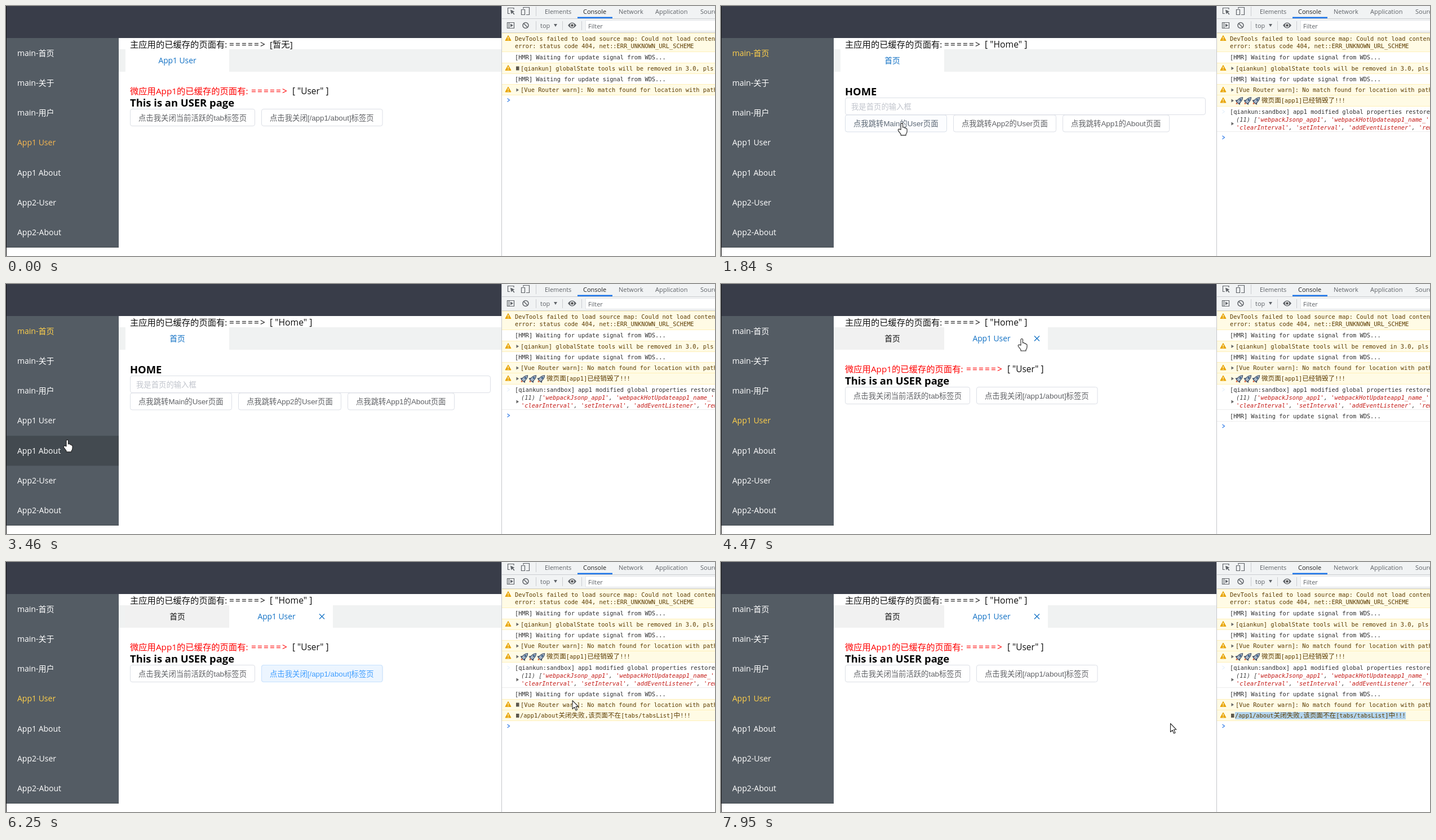
An HTML page that plays this animation: 1258x445 px, repeating every 8 s.

```html
<!DOCTYPE html>
<html lang="zh">
<head>
<meta charset="utf-8">
<title>Micro app tabs</title>
<style>
html, body { margin: 0; width: 100%; height: 100%; overflow: hidden; background: #fff; }
svg { display: block; }
text { white-space: pre; }
.ui { font-family: "Open Sans", "Noto Sans CJK SC", "Noto Sans CJK JP", sans-serif; }
.btn { font-family: "Liberation Sans", "Noto Sans CJK SC", "Noto Sans CJK JP", sans-serif; }
.mono { font-family: "DejaVu Sans Mono", "Noto Sans CJK SC", "Noto Sans CJK JP", monospace; }
</style>
</head>
<body>
<svg id="stage" width="1258" height="445" viewBox="0 0 1258 445"></svg>
<script>
const LOOP = 8000, HOME = 1830, APP = 3950, LOG = 4100, TAB = 4270, WARN = 4600, FAIL = 6090, SELECT = 7020;
const MENU = ['main-首页', 'main-关于', 'main-用户', 'App1 User', 'App1 About', 'App2-User', 'App2-About'];
const ROW = 53.3, BROWN = '#5c3c00', INK = '#303030', RED = '#c41a16';

const rect = (x, y, w, h, fill, extra = '') => `<rect x="${x}" y="${y}" width="${w}" height="${h}" fill="${fill}" ${extra}/>`;
const path = (d, fill, extra = '') => `<path d="${d}" fill="${fill}" ${extra}/>`;
const line = (d, color, w = 1) => path(d, 'none', `stroke="${color}" stroke-width="${w}"`);
// y is the vertical middle of the line
const text = (x, y, s, size, fill, extra = '', cls = 'ui') =>
  `<text class="${cls}" x="${x}" y="${(y + size * .36).toFixed(1)}" font-size="${size}" fill="${fill}" ${extra}>${s}</text>`;
const mono = (x, y, s, fill = INK, extra = '') =>
  text(x, y, s.replace(/[\u4e00-\u9fff]+/g, '<tspan font-size="11.6">$&</tspan>'), 10.35, fill, extra, 'mono');
// shown while from <= t < to
const during = (from, to, body) => `<g data-from="${from}" data-to="${to}">${body}</g>`;

const buttons = [
  { x: 220, y: 183.5, w: 221, s: '点击我关闭当前活跃的tab标签页', page: 'app' },
  { x: 453, y: 183.5, w: 214.5, s: '点击我关闭[/app1/about]标签页', page: 'app' },
  { x: 220, y: 194, w: 180, s: '点我跳转Main的User页面', page: 'home' },
  { x: 412, y: 194, w: 182, s: '点我跳转App2的User页面', page: 'home' },
  { x: 606, y: 194, w: 189, s: '点我跳转App1的About页面', page: 'home' }
];
function button(b) {
  const face = (bg, edge, ink) => rect(b.x + .5, b.y, b.w, 30, bg, `rx="3.5" stroke="${edge}"`) +
    text(b.x + 15, b.y + 15.3, b.s, 13.35, ink, '', 'btn');
  return face('#fff', '#dcdfe6', '#606266') +
    `<g class="hover" opacity="0">${face('#ecf5ff', '#c6e2ff', '#409eff')}</g>`;
}
const buttonsOf = page => buttons.filter(b => b.page === page).map(button).join('');

const arrow = (x, y, fill) => text(x, y, '=====>', 15.4, fill, 'letter-spacing="2.2"');
const title = (y, s) => text(220, y, s, 18.4, '#000', 'font-weight="700"');

function shell() {
  const items = MENU.map((s, i) => text(20, 83.5 + i * ROW, s, 14, '#fff', 'data-item')).join('');
  return rect(0, 0, 880, 57, '#393d49') + rect(1, 57, 199, 373, '#545c64') +
    rect(1, 57, 199, ROW, '#434a50', 'id="menuHover"') + rect(1, 429, 199, 1, '#434a50') +
    items + rect(0, 0, 1, 445, '#111');
}

function tabs() {
  const blue = '#1070c4', mid = 'text-anchor="middle"';
  const label = (x, s, fill) => text(x, 97, s, 13.8, fill, mid);
  return text(220, 68, '主应用的已缓存的页面有:', 15.3, '#111') + arrow(396, 68, '#111') +
    during(0, HOME, text(468, 68, '[暂无]', 15.3, '#111')) +
    during(HOME, LOOP, text(468, 68, '[ "Home" ]', 15.7, '#111')) +
    rect(200, 77, 680, 40, '#f0f2f2') +
    during(0, TAB, rect(212, 77, 184, 40, '#fff')) +
    during(0, HOME, label(304, 'App1 User', blue)) +
    during(HOME, TAB, label(304, '首页', blue)) +
    during(TAB, LOOP, rect(212, 77, 184, 40, '#f1f1f1') + rect(396, 77, 184, 40, '#fff') +
      label(304, '首页', '#111') + label(480, 'App1 User', blue) +
      line('M556 92.5l9 9m0 -9l-9 9', blue, 1.2));
}

const userPage = () =>
  text(220, 151, '微应用App1的已缓存的页面有:', 15.3, '#f00') + arrow(435, 151, '#f00') +
  text(508, 151, '[ "User" ]', 15.4, '#111') + title(172, 'This is an USER page') + buttonsOf('app');
const homePage = () => title(152, 'HOME') +
  rect(220.5, 163.5, 639, 30, '#fff', 'rx="3.5" stroke="#dcdfe6"') +
  text(231, 179, '我是首页的输入框', 13.35, '#c0c4cc', '', 'btn') + buttonsOf('home');

function toolbar() {
  const gray = '#5f6368';
  const tab = (x, s, fill = gray) => text(x, 9.5, s, 11, fill);
  return rect(880, 0, 378, 47, '#f1f3f4') + line('M880 22.5H1258M880 47.5H1258', '#cbcdd1') +
    rect(1014, 19.5, 62, 2.5, '#1a73e8') +
    tab(956, 'Elements') + tab(1024, 'Console', '#222') + tab(1087, 'Network') +
    tab(1152, 'Application') + tab(1232, 'Sources') +
    line('M940.5 1V18M940.5 27V43M987.5 27V43M1021.5 27V43', '#cbcdd1') +
    line('M901 6V3.5H890.5V13.5H894', gray, 1.2) + path('M895 6.5l7.5 3.5-3 1 3 3.5-1.3 1-2.8-3.5-2 2.5z', gray) +
    line('M918 5V2.5H928.5V15.5H923M914.500 6.500h6v9h-6z', gray, 1.2) +
    line('M889.5 29.500h12v10h-12zM892.500 29.500v10', gray, 1.2) + path('M895 31.500l5 3-5 3z', gray) +
    `<circle cx="922" cy="34.500" r="5" fill="none" stroke="${gray}" stroke-width="1.5"/>` + line('M918.500 31l7 7', gray, 1.5) +
    text(948, 35, 'top', 11, gray) + path('M972 32h6l-3 5z', gray) +
    path('M997 34.500q7.500-10 15 0q-7.500 10-15 0z', gray) +
    '<circle cx="1004.500" cy="34.500" r="3" fill="#555" stroke="#f1f3f4" stroke-width="1.300"/>' +
    rect(1028.5, 25.5, 240, 19, '#fff', 'stroke="#e4e6e8"') + text(1033, 35.500, 'Filter', 11, gray);
}

const expander = y => path(`M905.5 ${y - 3}l4.500 3-4.500 3z`, '#666');
const block = y => rect(905, y - 3.5, 5.5, 7, '#5d584c');
const sign = y => path(`M891 ${y - 5}l5 9h-10z`, '#e8a400', 'stroke="#e8a400" stroke-linejoin="round"') +
  line(`M891 ${y - 2.5}v3.500m0 1v1.500`, '#fff', 1.2);
const rocket = (x, y) => `<g transform="translate(${x} ${y}) rotate(45)">` +
  path('M-3 1l-3 4 3 0zM3 1l3 4-3 0z', '#3d4a63') + path('M0-8Q4-4 3 5H-3Q-4-4 0-8z', '#a9b8c8', 'stroke="#33415a"') +
  '<circle cy="-2" r="1.500" fill="#26507c"/>' + path('M-2 6h4l-2 3z', '#d9552c') + '</g>';
const warn = (top, h, iconY, body) => rect(880, top, 378, h, '#fffbe5') +
  line(`M880 ${top + .5}h378m0 ${h}h-378`, '#fff0b8') + sign(iconY) + body;
const hmr = y => mono(903, y, '[HMR] Waiting for update signal from WDS...');
const router = y => mono(913, y, '[Vue Router warn]: No match found for location with path', BROWN);
const prompt = y => line(`M889.500 ${y - 3}l4 3-4 3`, '#3a82e8', 1.3);

function log() {
  const em = 'font-style="italic"', red = s => `<tspan fill="${RED}">${s}</tspan>`;
  return warn(48, 33, 57.5,
      mono(903, 58.5, 'DevTools failed to load source map: Could not load content', BROWN) +
      mono(903, 71.5, 'error: status code 404, net::ERR_UNKNOWN_URL_SCHEME', BROWN)) +
    hmr(91) +
    warn(101, 19, 110.5, during(0, HOME, block(111)) + during(HOME, LOOP, expander(111)) +
      mono(913, 111, '[qiankun] globalState tools will be removed in 3.0, pls don', BROWN)) +
    hmr(130.5) +
    warn(139, 19, 149, expander(149.5) + router(149.5)) +
    during(0, HOME, prompt(167.5)) +
    during(HOME, LOOP,
      warn(158, 20, 168, expander(168.5) + [920, 935, 950].map(x => rocket(x, 168.5)).join('') +
        mono(959, 168.5, '微页面[app1]已经销毁了!!!', BROWN)) +
      line('M889.500 185l4 3-4 3', '#dcebfa') +
      mono(903, 188.5, '[qiankun:sandbox] app1 modified global properties restored') +
      mono(914, 202, `(11) [${red("'webpackJsonp_app1'")}, ${red("'webpackHotUpdateapp1_name_'")}`, '#444', em) +
      expander(209.5) +
      mono(914, 216, `${red("'clearInterval'")}, ${red("'setInterval'")}, ${red("'addEventListener'")}, ${red("'remove'")}`, '#444', em) +
      line('M880 223.500h378', '#eee')) +
    during(HOME, LOG, prompt(234)) +
    during(LOG, LOOP, hmr(235.5) + line('M880 244.500h378', '#eee')) +
    during(LOG, WARN, prompt(253)) +
    during(WARN, LOOP, warn(244, 19, 253.5,
      during(WARN, 6790, block(254)) + during(6790, LOOP, expander(254)) + router(254))) +
    during(WARN, FAIL, prompt(273)) +
    during(FAIL, LOOP, warn(263, 19, 273, block(273.5) + rect(1215, 267, 0, 13, '#b4d5ee', 'id="selection"') +
      mono(912, 273.5, '/app1/about关闭失败,该页面不在[tabs/tabsList]中!!!', BROWN)) + prompt(292));
}

const outline = 'stroke="#222" stroke-width="1.100" stroke-linejoin="round"';
const stage = document.getElementById('stage');
stage.innerHTML = rect(0, 0, 1258, 445, '#fff') + shell() + tabs() +
  during(0, HOME, userPage()) + during(HOME, APP, homePage()) + during(APP, LOOP, userPage()) +
  toolbar() + log() + line('M879.500 0V445', '#c4c6ca') +
  '<g id="cursor">' +
  path('M.5 .5V15.500L4 12.300 6.500 18 9 17 6.500 11.300H11z', '#fff', `id="arrow" ${outline}`) +
  path('M-2 12V2Q-2 .5-.3 .5T1.500 2V8Q4.500 6.800 4.700 9Q7 8.500 7 10Q9 9.700 9 12V15Q9 18 7 20V22H-2V20L-6.500 14Q-7.500 11.500-5 11z',
    '#fff', `id="hand" ${outline}`) + '</g>';

// time, x, y of the pointer
const track = [
  [130, 978, 417], [470, 600, 310], [820, 316, 204], [980, 316, 204], [1050, 312, 201], [1750, 312, 201],
  [2070, 344, 226], [2150, 344, 226], [2540, 396, 236], [2610, 396, 236], [2980, 150, 290], [3150, 109, 277],
  [3460, 109, 277], [3700, 103, 245], [3850, 103, 245], [4160, 400, 120], [4470, 534, 97], [4650, 534, 97],
  [5010, 160, 250], [5160, 155, 255], [5400, 260, 276], [5800, 540, 205], [5940, 560, 200], [6020, 560, 200],
  [6250, 1004, 246], [6560, 1190, 277], [6790, 1190, 277], [6870, 1218, 277], [7020, 1218, 277],
  [7720, 908, 286], [7950, 797, 287]
];
function pointer(t) {
  const i = track.findIndex(k => k[0] > t);
  if (i < 0) return track.at(-1).slice(1);
  if (!i) return [-50, 500];
  const [a, x, y] = track[i - 1], [b, u, v] = track[i], p = (t - a) / (b - a);
  return [x + (u - x) * p, y + (v - y) * p];
}
const pageAt = t => t >= HOME && t < APP ? 'home' : 'app';
function over(b, t) {
  const [x, y] = pointer(t);
  return b.page === pageAt(t) && x > b.x && x < b.x + b.w && y > b.y && y < b.y + 30;
}
// share of the last 150 ms spent over the button
function glow(b, t) {
  if (b === buttons[1] && t > 5950 && t < SELECT) return 1;
  let n = 0;
  for (let i = 0; i < 10; i++) n += over(b, t - i * 15);
  return n / 10;
}

const $ = id => document.getElementById(id);
const timed = [...stage.querySelectorAll('[data-from]')];
const items = [...stage.querySelectorAll('[data-item]')];
const hovers = [...stage.querySelectorAll('.hover')];
const hoverButtons = ['app', 'home', 'app'].flatMap(p => buttons.filter(b => b.page === p));
const show = (el, on) => { el.style.display = on ? '' : 'none'; };

function draw(t) {
  const [x, y] = pointer(t);
  timed.forEach(g => show(g, t >= +g.dataset.from && t < +g.dataset.to));
  const active = t >= HOME && t < TAB ? 0 : 3;
  items.forEach((el, i) => el.setAttribute('fill', i !== active ? '#fff' : t < HOME ? '#f8b850' : '#ffd04b'));
  hovers.forEach((g, i) => g.setAttribute('opacity', glow(hoverButtons[i], t)));

  const inMenu = x > 0 && x < 200 && y > 57 && y < 430;
  show($('menuHover'), inMenu);
  $('menuHover').setAttribute('y', 57 + Math.floor((y - 57) / ROW) * ROW);

  const left = t < SELECT ? 1215 : Math.min(1215, Math.max(912, x));
  $('selection').setAttribute('x', left);
  $('selection').setAttribute('width', 1215 - left);

  const hand = inMenu || y < 117 || buttons.some(b => over(b, t));
  show($('hand'), hand);
  show($('arrow'), !hand);
  $('cursor').setAttribute('transform', `translate(${x.toFixed(1)} ${y.toFixed(1)})`);
}

const start = performance.now();
function tick() {
  draw((performance.now() - start) % LOOP);
  requestAnimationFrame(tick);
}
tick();
</script>
</body>
</html>
```
